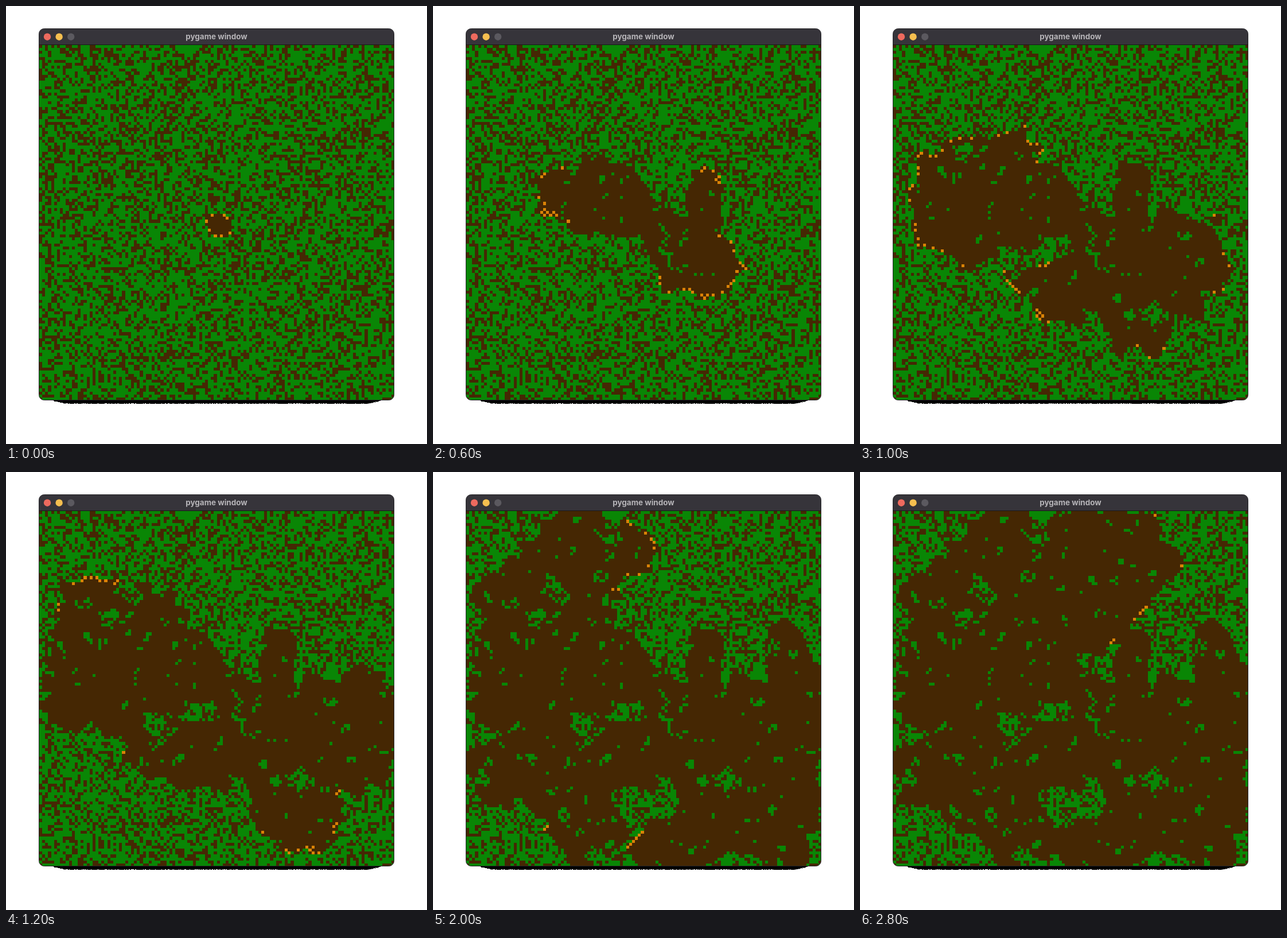
An HTML page with a canvas for the animation above (3 s loop, 734 by 763 pixels).

```html
<!DOCTYPE html>
<html lang="en">
<head>
<meta charset="utf-8">
<title>pygame window</title>
<style>
  html, body { margin: 0; width: 100%; height: 100%; overflow: hidden; background: #fff; }
  canvas { display: block; }
</style>
</head>
<body>
<canvas id="stage" width="734" height="763"></canvas>
<script>
const ctx = document.getElementById("stage").getContext("2d");
const LOOP = 3000, TICK = 200;
const SIZE = 120, LEFT = 58, TOP = 68, FIELD = 619, CELL = FIELD / SIZE;
const DENSITY = 0.63, SPREAD = 0.24, GLOW = 24;
const GREEN = "#098605", BROWN = "#452703", ORANGE = "#d98206";

function seeded(seed) {
  return () => {
    seed = (seed + 0x6d2b79f5) | 0;
    let n = Math.imul(seed ^ (seed >>> 15), seed | 1);
    n ^= n + Math.imul(n ^ (n >>> 7), n | 61);
    return ((n ^ (n >>> 14)) >>> 0) / 4294967296;
  };
}

// A fire front walks a path at an even beat and spreads sideways up to its reach.
const segments = [];
function front(start, beat, reach, path) {
  const points = path.split(" ").map(pair => pair.split(",").map(Number));
  points.slice(1).forEach((to, i) => {
    segments.push({ from: points[i], to, start: start + i * beat, beat, reach });
  });
}
front(-100, 250, 95, "372,382 310,332 235,325 165,335 110,320");
front(-100, 225, 90, "372,382 430,415 465,445 540,455 600,460 650,430");
front(200, 300, 32, "470,390 472,305");
front(400, 250, 75, "450,460 485,525 510,590");
front(500, 225, 55, "410,470 365,505 260,470");
front(550, 400, 50, "270,390 110,405");
front(700, 280, 75, "240,280 140,240 200,185 265,130 340,140 410,145 475,150 525,165");
front(950, 450, 38, "620,370 615,300");
front(1100, 250, 60, "560,560 620,550 610,630");
front(1150, 250, 55, "250,510 210,560 285,620 190,655");
front(1200, 350, 50, "480,630 420,650 360,665");
front(1550, 200, 55, "170,500 110,525 100,560 100,610");
front(1950, 375, 80, "320,215 390,240 480,225");

const wobble = (x, y) =>
  Math.sin(x / 16 + 2 * Math.sin(y / 37)) * Math.sin(y / 16 + 2 * Math.sin(x / 41));

function ignitionTime(x, y) {
  const rough = wobble(x, y);
  if (rough > 0.88) return Infinity; // damp ground
  return Math.min(...segments.map(({ from: [ax, ay], to: [bx, by], start, beat, reach }) => {
    const dx = bx - ax, dy = by - ay;
    const along = ((x - ax) * dx + (y - ay) * dy) / (dx * dx + dy * dy);
    const u = Math.max(0, Math.min(1, along));
    const distance = Math.hypot(x - ax - u * dx, y - ay - u * dy) * (1 + 0.18 * rough);
    const passing = start + u * beat;
    return distance < Math.min(reach, 45 + passing / 12) ? passing + distance / SPREAD : Infinity;
  }));
}

const random = seeded(41);
const trees = Array.from({ length: SIZE * SIZE }, (_, index) => {
  const col = index % SIZE, row = Math.floor(index / SIZE);
  const alive = random() < DENSITY;
  const x = LEFT + (col + 0.5) * CELL, y = TOP + (row + 0.5) * CELL;
  return { col, row, alive, reached: false, time: alive ? ignitionTime(x, y) : Infinity };
});

// Fire only passes between trees that share a side.
const queue = trees.filter(tree => tree.time <= 0);
queue.forEach(tree => { tree.reached = true; });
for (const { col, row } of queue) {
  for (const [dx, dy] of [[1, 0], [-1, 0], [0, 1], [0, -1]]) {
    const x = col + dx, y = row + dy;
    if (x < 0 || y < 0 || x >= SIZE || y >= SIZE) continue;
    const next = trees[y * SIZE + x];
    if (next.alive && !next.reached) {
      next.reached = true;
      queue.push(next);
    }
  }
}

function treeColor(tree, t) {
  if (!tree.alive) return BROWN;
  if (!tree.reached || tree.time > t) return GREEN;
  const glowing = t - tree.time < GLOW && (tree.col + tree.row) % 2 === 1;
  return glowing ? ORANGE : BROWN;
}

function drawForest(t) {
  for (const tree of trees) {
    const x = Math.round(LEFT + tree.col * CELL), y = Math.round(TOP + tree.row * CELL);
    const right = Math.round(LEFT + (tree.col + 1) * CELL);
    const bottom = Math.round(TOP + (tree.row + 1) * CELL);
    ctx.fillStyle = treeColor(tree, t);
    ctx.fillRect(x, y, right - x, bottom - y);
  }
}

function drawShadow() {
  const ragged = seeded(7);
  ctx.fillStyle = "#000";
  for (let x = 82; x < 653; x++) {
    const taper = Math.min(1, (x - 80) / 24, (655 - x) / 24);
    ctx.fillRect(x, 686, 1, Math.round(1 + taper * 5 + ragged() * 1.5));
  }
}

function drawTitleBar() {
  ctx.fillStyle = "#36343a";
  ctx.fillRect(LEFT - 1, 39, FIELD + 1, 29);
  ctx.fillStyle = "#19181b";
  ctx.fillRect(LEFT - 1, 67, FIELD + 1, 1);
  ["#ed6a5e", "#f5bf4f", "#5b595f"].forEach((color, i) => {
    ctx.fillStyle = color;
    ctx.beginPath();
    ctx.arc(72 + i * 20.6, 53.7, 6.2, 0, Math.PI * 2);
    ctx.fill();
  });
  ctx.fillStyle = "#b6b4b8";
  ctx.font = "bold 13.5px Inter, sans-serif";
  ctx.textAlign = "center";
  ctx.fillText("pygame window", 367, 58);
}

function draw(t) {
  ctx.fillStyle = "#fff";
  ctx.fillRect(0, 0, 734, 763);
  drawShadow();
  const frame = new Path2D();
  frame.roundRect(57.5, 39.5, 619, 647, 9);
  ctx.save();
  ctx.clip(frame);
  drawForest(t);
  drawTitleBar();
  ctx.restore();
  ctx.strokeStyle = "#242326";
  ctx.lineWidth = 1;
  ctx.stroke(frame);
}

let shown = -1;
function play() {
  const t = Math.floor(performance.now() % LOOP / TICK) * TICK;
  if (t !== shown) draw(shown = t);
  requestAnimationFrame(play);
}
play();
</script>
</body>
</html>
```
